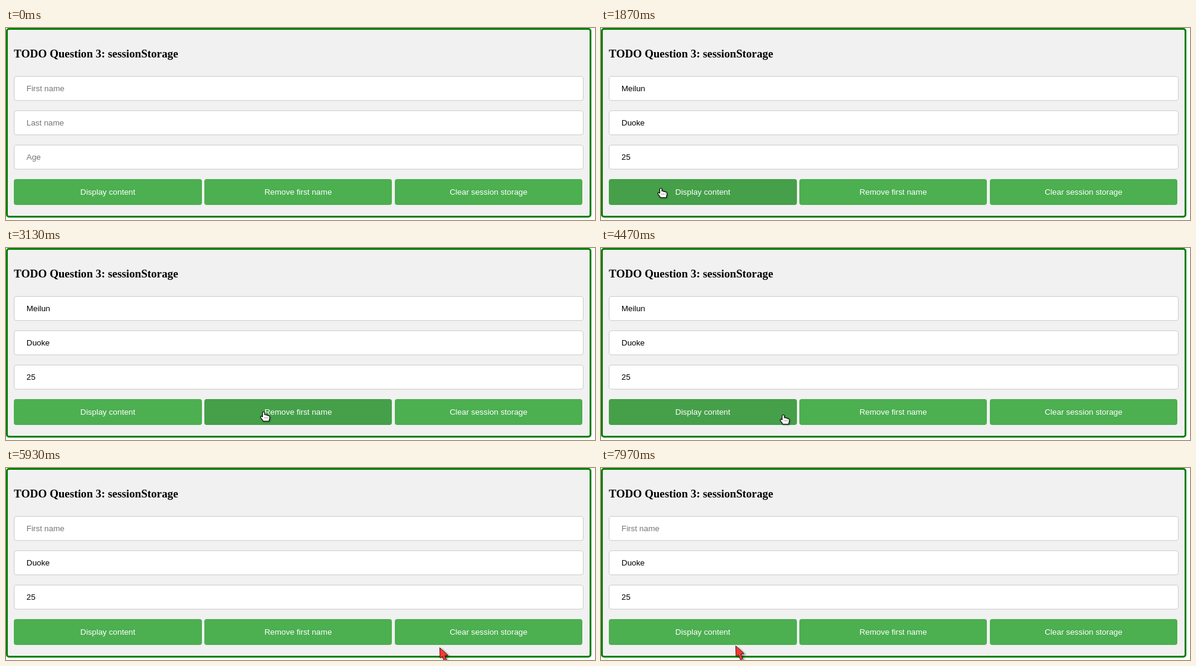
These frames come from a looping animation (977x319 px, 8000 ms). An HTML page:

```html
<!DOCTYPE html>
<html lang="en">
<head>
<meta charset="utf-8">
<title>sessionStorage form</title>
<style>
  html, body { margin: 0; width: 100%; height: 100%; overflow: hidden; background: #fff; }
  body { position: relative; font: 13.333px/15px "Liberation Sans", Arial, sans-serif; }
  body * { box-sizing: border-box; }
  .panel { position: absolute; left: 0; top: 0; width: 971px; height: 315px;
    border: 3px solid green; border-radius: 5px; background: #f1f1f1; }
  h3 { position: absolute; left: 13px; top: 32px; margin: 0; white-space: nowrap;
    font: bold 18.72px/21px "Liberation Serif", "Times New Roman", serif; }
  .field { position: absolute; left: 13px; width: 945px; height: 41px; padding: 12px 20px;
    border: 1px solid #ccc; border-radius: 4px; background: #fff; }
  .empty { color: #757575; }
  .button { position: absolute; top: 251px; width: 311.7px; height: 43px; padding: 14px 20px;
    border-radius: 4px; background: #4caf50; color: #fff; text-align: center; }
  .hover { background: #45a049; }
  svg { position: absolute; left: 0; top: 0; width: 977px; height: 319px; }
  #hand { fill: #fff; stroke: #000; stroke-width: 1.1; stroke-linejoin: round;
    filter: drop-shadow(1px 1px 1px #0006); }
  #arrow { fill: #f23b30; stroke: #501512; stroke-linejoin: round;
    filter: drop-shadow(3px 2px 1.5px #0006); }
</style>
</head>
<body>
<div class="panel"></div>
<h3>TODO Question 3: sessionStorage</h3>
<div class="field"></div>
<div class="field"></div>
<div class="field"></div>
<div class="button">Display content</div>
<div class="button">Remove first name</div>
<div class="button">Clear session storage</div>
<svg>
  <g id="hand">
    <path d="M-1.5 8.5V1.5Q-1.3 .3 .3.3T2 1.5V5Q3.6 4.4 4.6 5.6Q6.4 5 7.4 6.4Q10.3 6.2 10.3 8.6V11.5Q9.6 13 9.3 15.7H-.5Q-1.6 13-4.6 9.8Q-5.2 7.4-3 7.4Z"/>
    <path d="M2 9.5v1M4.5 9.5v1M7 9.5v1" stroke-width="1"/>
  </g>
  <path id="arrow" d="M.5.5L1 18L5 15L8.2 23.6L12 22L8.8 14L14 13Z"/>
</svg>
<script>
const LOOP = 8000, STEP = 75, SETTLE_DELAY = 200;
const LABELS = ["First name", "Last name", "Age"];
const VALUES = ["Meilun", "Duoke", "25"];
const SHOW_AT = 1870, REMOVE_AT = 5230;

// Each glide ends at (x, y); a settling one stops a little short first.
const GLIDES = [
  { start: 1000, length: 300, x: 99, y: 266 },
  { start: 2400, length: 530, x: 427, y: 272, settles: true },
  { start: 4430, length: 100, x: 162, y: 272, settles: true },
  { start: 5630, length: 300, x: 719, y: 298 },
  { start: 6730, length: 0, x: 741, y: 335 },
  { start: 6870, length: 200, x: 741, y: 280, settles: true },
  { start: 7670, length: 300, x: 223, y: 295 }
];

const fields = [...document.querySelectorAll(".field")];
const buttons = [...document.querySelectorAll(".button")];
const hand = document.getElementById("hand");
const arrow = document.getElementById("arrow");
const buttonLeft = i => 13 + 315.8 * i;

fields.forEach((field, i) => field.style.top = 80 + 57 * i + "px");
buttons.forEach((button, i) => button.style.left = buttonLeft(i) + "px");

function pointerAt(time) {
  let x = 560, y = 335;
  for (const glide of GLIDES) {
    const elapsed = time - glide.start;
    if (elapsed < 0) break;
    const short = glide.settles && elapsed < glide.length + SETTLE_DELAY;
    const steps = Math.round(glide.length / STEP) + 1;
    const done = Math.min(1, (Math.floor(elapsed / STEP) + 1) / steps);
    x += (glide.x - x) * done * (short ? 0.94 : 1);
    y += (glide.y + (short ? 10 : 0) - y) * done;
  }
  return [Math.round(x), Math.round(y)];
}

function render(time) {
  fields.forEach((field, i) => {
    const filled = time >= SHOW_AT && (i > 0 || time < REMOVE_AT);
    field.textContent = (filled ? VALUES : LABELS)[i];
    field.classList.toggle("empty", !filled);
  });

  const [x, y] = pointerAt(time);
  const inRow = y >= 251 && y < 294;
  const over = buttons.findIndex((_, i) => inRow && x >= buttonLeft(i) && x < buttonLeft(i) + 311.7);
  buttons.forEach((button, i) => button.classList.toggle("hover", i === over));

  hand.style.display = over < 0 ? "none" : "";
  arrow.style.display = over < 0 ? "" : "none";
  for (const shape of [hand, arrow]) shape.setAttribute("transform", `translate(${x} ${y})`);
}

const began = performance.now();
function tick() {
  render((performance.now() - began) % LOOP);
  requestAnimationFrame(tick);
}
tick();
</script>
</body>
</html>
```
